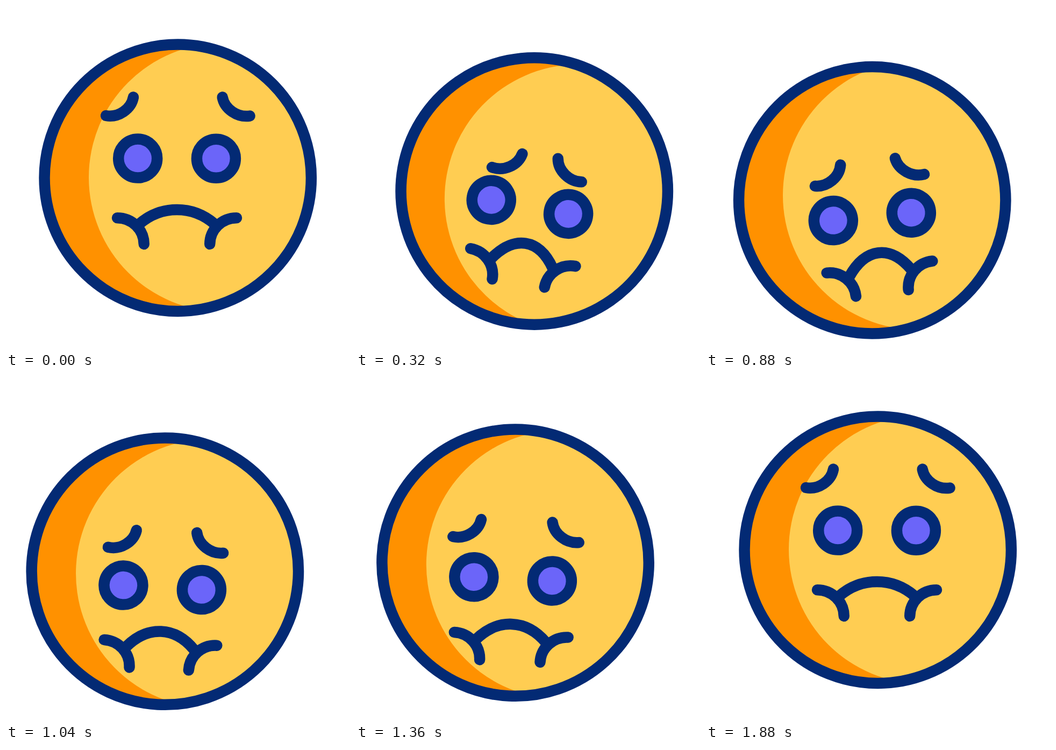
An HTML page that plays this animation: 640 px wide and 640 px high, repeating every 2000 ms.

```html
<!DOCTYPE html>
<html lang="en">
<head>
<meta charset="utf-8">
<title>Queasy face</title>
<style>
  html, body { margin: 0; width: 100%; height: 100%; overflow: hidden; background: #fff; }
  svg { display: block; width: 100vw; height: 100vh; }
  .line { fill: none; stroke: #032a74; stroke-width: 20.5; stroke-linecap: round; }
  .eye { fill: #6b65f9; }
</style>
</head>
<body>
<svg viewBox="0 0 640 640">
  <defs>
    <clipPath id="disc"><circle cx="319.7" cy="319.8" r="248"/></clipPath>
  </defs>
  <g id="head">
    <circle cx="319.7" cy="319.8" r="248" fill="#ff9100"/>
    <circle cx="404" cy="319" r="250" fill="#ffcd52" clip-path="url(#disc)"/>
    <circle class="line" cx="319.7" cy="319.8" r="248.2"/>
    <g id="features">
      <path id="browL" class="line" d="M186 204C209 208 233 192 237 169.5"/>
      <path id="browR" class="line" d="M453.6 204.6C430.5 208 406.5 191.5 402.6 169.5"/>
      <circle class="line eye" cx="245.2" cy="283.6" r="36"/>
      <circle class="line eye" cx="390.9" cy="283.8" r="36"/>
      <path id="lip" class="line" style="stroke-linecap:butt"/>
      <path id="curlL" class="line" d="M207 394.2A49.7 49 0 0 1 256.7 443"/>
      <path id="curlR" class="line" d="M429 394.2A49.7 49 0 0 0 379.2 443"/>
    </g>
  </g>
</svg>
<script>
const LOOP = 2000, STEP = 40, END = 1880, RAMP = 320;

// The head swings through these poses on a smooth curve; every second one puckers the mouth.
const poses = [
  { t: 0, x: 320, y: 319.8, tilt: 0 },
  { t: 320, x: 332, y: 344.5, tilt: 10.2 },
  { t: 600, x: 332, y: 361, tilt: -0.2 },
  { t: 880, x: 309.5, y: 361.3, tilt: -5.75 },
  { t: 1200, x: 290.5, y: 354, tilt: 8.9 },
  { t: 1560, x: 310.5, y: 329.5, tilt: -6.7 },
  { t: END, x: 320, y: 319.8, tilt: 0 },
];

// Cubic spline through one pose property, at rest at both ends.
function spline(key) {
  const v = poses.map(p => p[key]);
  const m = v.map(() => 0);
  for (let pass = 0; pass < 30; pass++) {
    for (let i = 1; i < v.length - 1; i++) {
      m[i] = (3 * (v[i + 1] - v[i - 1]) - m[i - 1] - m[i + 1]) / 4;
    }
  }
  return s => {
    const i = Math.min(Math.floor(s), v.length - 2), u = s - i, w = 1 - u;
    return v[i] * w * w * (1 + 2 * u) + v[i + 1] * u * u * (3 - 2 * u)
      + u * w * (m[i] * w - m[i + 1] * u);
  };
}

const headX = spline("x"), headY = spline("y"), tilt = spline("tilt");

const ease = u => (1 - Math.cos(Math.PI * u)) / 2;

// Position along the poses: whole numbers fall on a pose.
function progress(t) {
  let i = 0;
  while (i < poses.length - 2 && t >= poses[i + 1].t) i++;
  return i + (t - poses[i].t) / (poses[i + 1].t - poses[i].t);
}

const part = id => document.getElementById(id);
const move = (id, x, y) => part(id).setAttribute("transform", `translate(${x} ${y})`);

function drawMouth(p) {
  const left = [16.3 * p, -14.8 * p], right = [-7.8 * p, -17 * p];
  move("curlL", ...left);
  move("curlR", ...right);
  const x1 = 248 + left[0], y1 = 405.5 + left[1];
  const x2 = 388 + right[0], y2 = 405.5 + right[1];
  const dx = 41 - 6 * p, dy = 35.3 + 15 * p;
  part("lip").setAttribute("d",
    `M${x1} ${y1}C${x1 + dx} ${y1 - dy} ${x2 - dx} ${y2 - dy} ${x2} ${y2}`);
}

function draw(t) {
  const s = progress(t);
  part("head").setAttribute("transform",
    `translate(${headX(s)} ${headY(s)}) rotate(${tilt(s)}) translate(-320 -319.8)`);
  const drop = ease(Math.min(t / RAMP, 1, (END - t) / RAMP));
  const frown = Math.min(t / RAMP, (END - t) / (END - RAMP));
  move("features", -1.3 * drop, 66.5 * drop);
  move("browL", 49.7 * frown, 19.5 * frown);
  move("browR", -49 * frown, 16.3 * frown);
  drawMouth(ease(s));
}

const start = performance.now();
function tick() {
  const t = (performance.now() - start) % LOOP;
  draw(Math.min(Math.floor(t / STEP) * STEP, END));
  requestAnimationFrame(tick);
}
tick();
</script>
</body>
</html>
```
